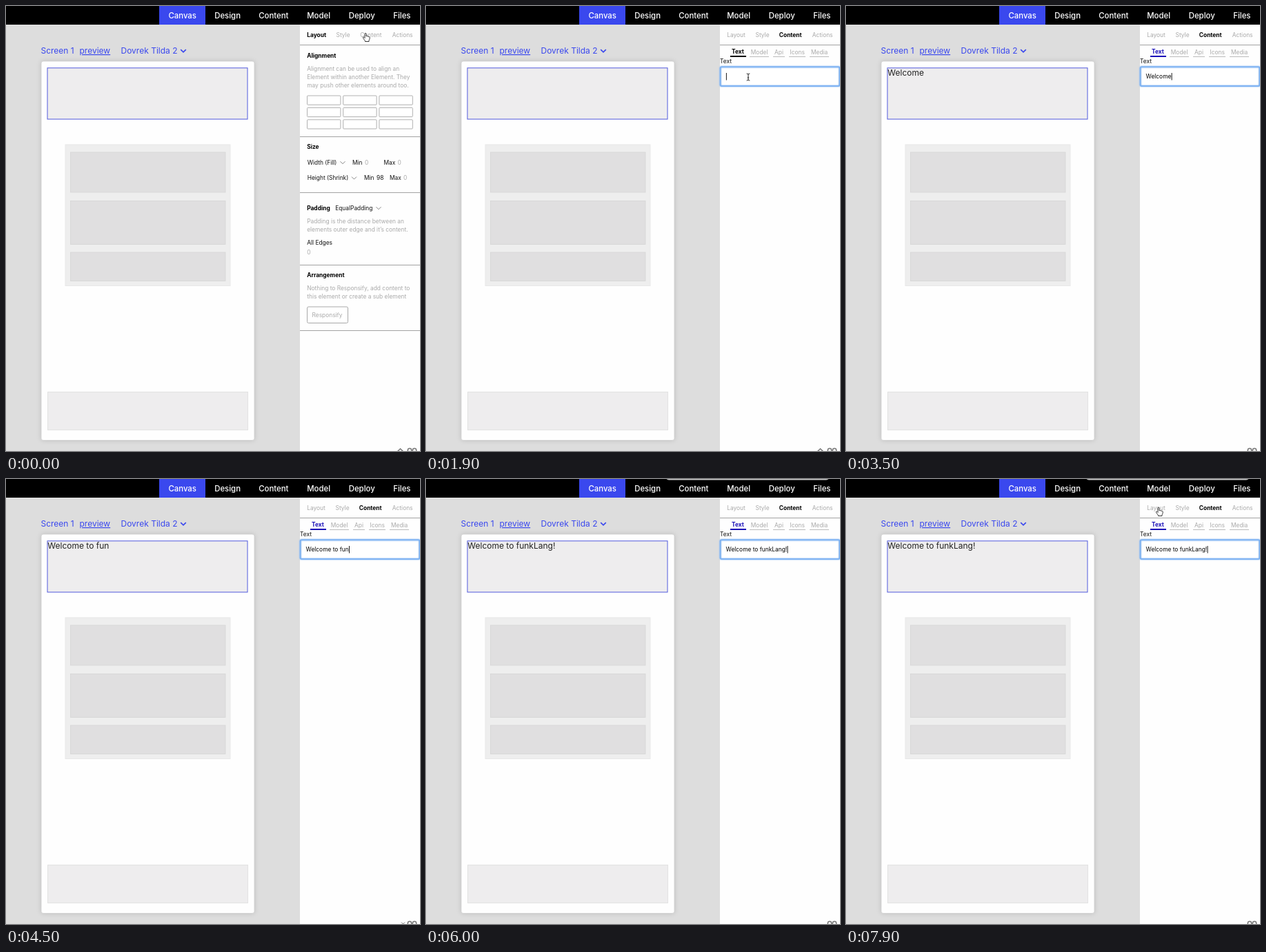
These frames come from a looping animation (600x645 px, 8 s). An HTML page:

```html
<!DOCTYPE html>
<html>
<head>
<meta charset="utf-8">
<style>
  html, body { margin: 0; width: 100%; height: 100%; overflow: hidden; background: #dddddd; }
  svg { display: block; width: 600px; height: 645px; }
  text { font: 8.4px Inter, Roboto, sans-serif; white-space: pre; }
  .b { font-weight: 700; }
  .nav { font-size: 11.4px; font-weight: 500; }
  .big { font-size: 12px; }
</style>
</head>
<body>
<svg id="stage" viewBox="0 0 600 645"></svg>
<script>
const LOOP = 8000, MESSAGE = 'Welcome to funkLang!';
const BLUE = '#3a48ee', GREY = '#a9a9a9', INK = '#111';

const text = (x, y, s, fill = INK, cls = '', extra = '') =>
  `<text x="${x}" y="${y}" fill="${fill}" class="${cls}" ${extra}>${s}</text>`;
const rect = (x, y, w, h, fill, stroke = 'none', extra = '') =>
  `<rect x="${x}" y="${y}" width="${w}" height="${h}" fill="${fill}" stroke="${stroke}" ${extra}/>`;
const group = (id, ...parts) => `<g id="${id}">${parts.join('')}</g>`;
const rule = y => rect(426, y, 174, 1, '#a3a3a3');
const chevron = (x, y, r, color, width) =>
  `<path d="M${x - r} ${y - r / 2}l${r} ${r}l${r} ${-r}" fill="none" stroke="${color}" stroke-width="${width}"/>`;
const arrow = (x, y) => chevron(x, y, 3.5, '#777', 0.9);
const lines = (y, ...rows) => rows.map((s, i) => text(436.2, y + i * 11.9, s, GREY)).join('');

const tabs = (active, xs) => ['Layout', 'Style', 'Content', 'Actions'].map((s, i) =>
  text(xs[i], 45, s, s === active ? '#000' : GREY, s === active ? 'b' : '')).join('');

// Each mark is [text x, underline start, underline end].
const subTabs = (active, marks) => ['Text', 'Model', 'Api', 'Icons', 'Media'].map((s, i) => {
  const [x, from, to] = marks[i], on = s === active;
  return text(x, on ? 69.2 : 69.8, s, on ? '#000' : GREY, on ? 'b' : '', on ? `id="on${s}"` : '') +
    rect(from, on ? 72 : 73, to - from, on ? 2 : 1, on ? '#000' : '#bbb', 'none', on ? `id="bar${s}"` : '');
}).join('');

const navBar = rect(0, 0, 600, 27, '#000') + rect(222, 0, 67, 27, BLUE) +
  [['Canvas', 235.4], ['Design', 302.2], ['Content', 366.2], ['Model', 436.2], ['Deploy', 496.7], ['Files', 561.2]]
    .map(([s, x]) => text(x, 17.5, s, '#fff', 'nav')).join('');

const phone =
  text(50.5, 69, 'Screen 1', BLUE, 'big') +
  text(106.5, 69, 'preview', BLUE, 'big', 'text-decoration="underline"') +
  text(166.5, 69, 'Dovrek Tilda 2', BLUE, 'big') + chevron(257, 65, 3.8, BLUE, 1.6) +
  rect(51, 80, 309, 549.5, '#fefefe', '#cfcfcf', 'rx="3" stroke-width=".8" style="filter:drop-shadow(0 0 3px #0002)"') +
  rect(60, 89.8, 290, 74.2, '#eeedee', '#5158dc') +
  rect(86, 201, 239, 204.5, '#eeeeee', '#e8e8e8') +
  [[212, 58], [282.5, 63], [357, 41.5]].map(([y, h]) => rect(93.5, y, 224.5, h, '#e0dfe0', '#d5d5d5', 'stroke-width=".8"')).join('') +
  rect(60.5, 559.5, 290, 55, '#eeedee', '#e2e2e2');

let cells = '';
for (let i = 0; i < 9; i++)
  cells += rect(436.5 + i % 3 * 52.2, 130 + (i / 3 | 0) * 17.4, 48.4, 13.2, '#fff', '#a8a8a8', 'rx="1" stroke-width=".9"');

const layout = group('layout',
  tabs('Layout', [436.2, 478.6, 513.2, 559.8]),
  text(436.2, 75, 'Alignment', '#000', 'b'),
  lines(94.2, 'Alignment can be used to align an', 'Element within another Element. They', 'may push other elements around too.'),
  cells, rule(189),
  text(436.2, 207, 'Size', '#000', 'b'),
  text(436.7, 229.7, 'Width (Fill)'), arrow(488, 227), text(502, 229.7, 'Min'), text(520, 229.7, '0', GREY),
  text(547.5, 229.7, 'Max'), text(567.5, 229.7, '0', GREY),
  text(436.7, 252, 'Height (Shrink)'), arrow(504.5, 249.3), text(519, 252, 'Min'), text(537, 252, '98'),
  text(556, 252, 'Max'), text(576, 252, '0', GREY),
  rule(270),
  text(436.2, 295.6, 'Padding', '#000', 'b'), text(477.2, 295.6, 'EqualPadding'), arrow(540, 293),
  lines(315, 'Padding is the distance between an', 'elements outer edge and it’s content.'),
  text(436.2, 345.6, 'All Edges'), text(436.2, 360.2, '0', GREY),
  rule(375),
  text(436.2, 393, 'Arrangement', '#000', 'b'),
  lines(412.4, 'Nothing to Responsify, add content to', 'this element or create a sub element'),
  rect(436.5, 436, 59, 23.5, '#fff', '#a8a8a8', 'rx="2"'), text(443.5, 450.8, 'Responsify', GREY),
  rule(470));

const icons = group('icons',
  rect(511, 37, 36, 10, '#fff', '#8fbdf5', 'stroke-width="2"'),
  subTabs('Icons', [[443.6, 442, 462], [470, 468, 496], [504, 502, 519], [526.5, 525, 551], [558, 556, 584]]),
  text(436.2, 94.8, 'Use the Design mode to select icons', GREY));

const entry = group('entry',
  subTabs('Text', [[443, 441, 464], [470.8, 469, 497], [505, 503, 520], [527.5, 526, 550], [558, 556, 584]]),
  text(426, 83.4, 'Text'),
  rect(427, 88.5, 172, 27, '#fff', '#b5b5b5', 'rx="1" id="field"'),
  rect(426.5, 88.3, 173, 27.6, 'none', '#7fb3f2', 'rx="2" stroke-width="2" id="ring" style="filter:drop-shadow(0 0 1px #8fbdf5)"'),
  text(434.6, 105, '', '#000', '', 'id="typed"'),
  rect(0, 97, 0.9, 10.5, '#000', 'none', 'id="caret"'));

const badge =
  `<g fill="none" stroke="#777" stroke-width="1.5"><path id="peak" d="M567.5 645.5l4-3.7l4 3.7"/>` +
  `<path id="dip" d="M573 642.5l2.5 2.5l2.5-2.5" stroke-width="1"/>` +
  `<circle cx="585" cy="644" r="2.7"/><circle cx="592" cy="644" r="2.7"/></g>`;

const hand = `<path id="hand" d="M-1 1C-1-.6 1-.6 1 1V4.4C1.6 3.6 2.7 3.8 2.9 4.7C3.6 4 4.6 4.3 4.7 5.2C5.5 4.7 6.3 5.2 6.2 6.2C6.2 8.5 5.6 9.3 5 10.4V12H-.6V10.8C-1.7 9.8-2.4 8.3-3.5 6.9C-4.1 5.9-2.9 5.1-2 6L-1 7Z" fill="#fff" stroke="#222" stroke-width=".9" stroke-linejoin="round"/>`;
const beam = `<path id="beam" d="M-2.3-5Q0-5 0-3.6Q0-5 2.3-5M0-3.6V3.6M-2.3 5Q0 5 0 3.6Q0 5 2.3 5M-1.2 1H1.2" fill="none" stroke="#222"/>`;

const stage = document.getElementById('stage');
stage.innerHTML = rect(0, 0, 600, 645, '#dddddd') + navBar + phone +
  text(60.3, 100.8, '', '#222', 'big', 'id="heading"') +
  rect(426, 27, 174, 618, '#fefefe') + layout + icons + entry +
  group('contentTabs', tabs('Content', [436.2, 477.6, 511.8, 559.8])) +
  rule(56) + badge +
  rect(348, -8, 236, 9.2, '#dadada', '#999', 'rx="4" stroke-width=".6" id="notice"') + hand + beam;

const $ = id => document.getElementById(id);
const show = (id, on) => $(id).setAttribute('visibility', on ? 'visible' : 'hidden');
const ease = p => p * p * (3 - 2 * p);

// Interpolates through [time, ...values] keys.
function track(keys, t, curve = p => p) {
  const i = keys.findIndex(k => k[0] > t);
  if (i < 0) return keys[keys.length - 1].slice(1);
  if (i === 0) return keys[0].slice(1);
  const a = keys[i - 1], b = keys[i], p = curve((t - a[0]) / (b[0] - a[0]));
  return a.slice(1).map((v, j) => v + (b[j + 1] - v) * p);
}

const typing = [[2500, 0], [3400, 7], [4450, 14], [5700, 20]];
const pointer = [[0, 521, 39.5], [350, 521, 39.5], [850, 451, 66], [1200, 451, 66], [1700, 467, 103],
  [6900, 467, 103], [7600, 453, 41.5]];

function draw(t) {
  const inText = t >= 1100, focused = t >= 1700, typed = t >= 2500;
  show('layout', t < 300);
  show('contentTabs', t >= 300);
  show('icons', t >= 300 && !inText);
  show('entry', inText);
  show('ring', focused);

  const s = MESSAGE.slice(0, Math.floor(track(typing, t)[0] + 1e-6));
  $('heading').textContent = $('typed').textContent = s;
  const busy = typed && t < 5700, since = t - (typed ? 5700 : 1700);
  show('caret', focused && (busy || since % 1000 < 500));
  $('caret').setAttribute('x', 434.9 + (s ? $('typed').getComputedTextLength() : 0));
  $('onText').setAttribute('fill', typed ? '#1a10b8' : '#000');
  $('barText').setAttribute('fill', typed ? '#1a10b8' : '#000');

  const [x, y] = track(pointer, t, ease);
  const visible = !typed || t >= 6800, overField = inText && y > 87;
  show('hand', visible && !overField);
  show('beam', visible && overField);
  for (const id of ['hand', 'beam']) $(id).setAttribute('transform', `translate(${x} ${y})`);

  show('peak', t < 2500);
  show('dip', t >= 4300 && t < 4800);
  show('notice', t >= 5800);
}

function tick() {
  draw(performance.now() % LOOP);
  requestAnimationFrame(tick);
}
tick();
</script>
</body>
</html>
```
